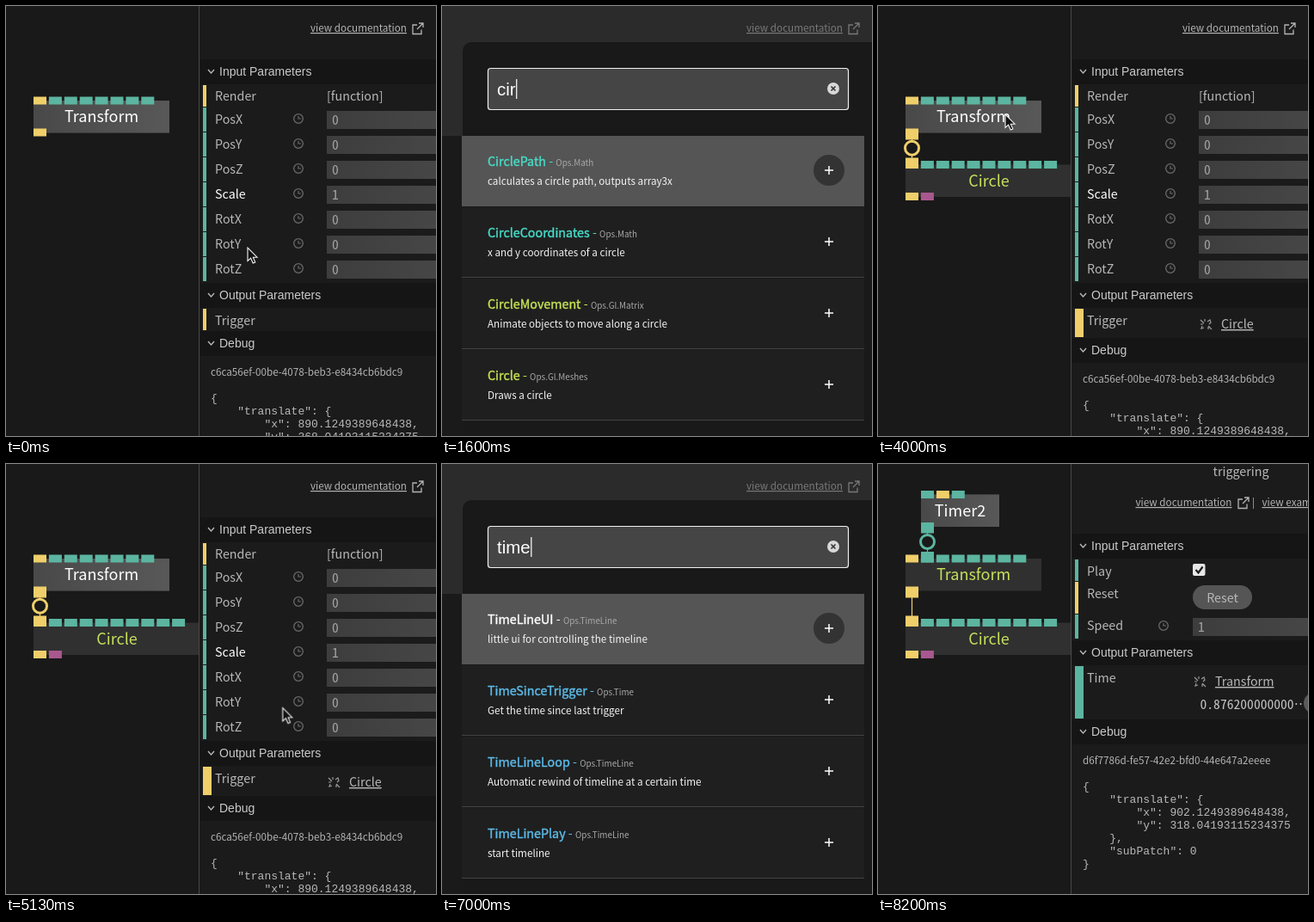
Recreate the animation shown at these times as an HTML page. Size 500 by 500 pixels, loop 8.27 s.

```html
<!DOCTYPE html>
<html lang="en">
<head>
<meta charset="utf-8">
<title>Node editor</title>
<style>
html, body { margin: 0; width: 100%; height: 100%; overflow: hidden; background: #191919; }
svg { display: block; width: 100vw; height: 100vh; }
text { font-family: "Noto Sans CJK SC", "Noto Sans CJK JP", "Source Sans Pro", "Open Sans", sans-serif; white-space: pre; }
.label { font-size: 14.3px; fill: #b8b8b8; }
.hot { fill: #fff; }
.small { font-size: 11.7px; fill: #b4b4b4; }
.white { font-size: 11.7px; fill: #f4f4f4; }
.op { font-size: 18px; fill: #c6e25c; text-anchor: middle; }
.op.on { fill: #fff; }
.mid { text-anchor: middle; }
.under { text-decoration: underline; }
.head { font: 14px "Liberation Sans", Arial, sans-serif; fill: #cacaca; }
.value { font: 15.6px "Noto Sans Mono CJK SC", "Noto Sans Mono CJK JP", "Noto Sans Mono", monospace; fill: #a4a4a4; }
.json { font: 13px "Liberation Mono", monospace; fill: #b8b8b8; }
.query { font: 20.5px "Liberation Sans", Arial, sans-serif; fill: #fff; }
.title { font-size: 14.3px; }
.name { stroke-width: .4px; }
.ns { font-size: 9.9px; fill: #a8a8a8; }
</style>
</head>
<body>
<svg id="stage" viewBox="0 0 500 500"></svg>
<script>
const LOOP = 8270;
const COLOR = { y: '#f0cf6a', t: '#5cb5a0', p: '#a9588f' };
const stage = document.getElementById('stage');
const tracks = [];

// Timing helpers: every animated group registers its opacity steps.
const track = (steps, content, easing = 'linear') =>
  `<g id="track${tracks.push({ steps, easing }) - 1}">${content}</g>`;
const during = (windows, content) => {
  const steps = windows.flatMap(([from, to]) => [[from, 1], [to, 0]]);
  if (steps[0][0] > 0) steps.unshift([0, 0]);
  if (steps.at(-1)[0] < LOOP) steps.push([LOOP, 0]);
  return track(steps, content, 'steps(1, end)');
};
const play = (el, prop, steps, easing) => el.animate(
  steps.map(([time, value]) => ({ offset: time / LOOP, [prop]: value, easing })),
  { duration: LOOP, iterations: Infinity });

// Drawing helpers
const rect = (x, y, w, h, fill, more = '') =>
  `<rect x="${x}" y="${y}" width="${w}" height="${h}" fill="${fill}" ${more}/>`;
const circle = (x, y, r, fill, more = '') => `<circle cx="${x}" cy="${y}" r="${r}" fill="${fill}" ${more}/>`;
const stroke = (d, color, width = 1) => `<path d="${d}" fill="none" stroke="${color}" stroke-width="${width}"/>`;
const text = (x, y, s, cls, more = '') => `<text x="${x}" y="${y}" class="${cls}" ${more}>${s}</text>`;

// Node graph
const ports = (kinds, x, y, h) =>
  [...kinds].map((k, i) => rect(x + i * 17.9, y, 15, h, COLOR[k])).join('');

const node = ({ x, y, w, name, ins, outs, selected, flash }) => {
  const body = (fill, cls) => rect(x, y, w, 37.5, fill) + text(x + w / 2, y + 25, name, 'op ' + cls);
  const glow = flash === undefined ? '' : track(
    [[0, 0], [flash, 0], [flash, 1], [flash + 400, 1], [flash + 830, 0], [LOOP, 0]],
    rect(x, y, w, 37.5, '#21895b', 'stroke="#22ee8a" stroke-width="3.5"') +
    text(x + w / 2, y + 25, name, 'op on'));
  return body('#303030', '') + during(selected, body('url(#bright)', 'on')) + glow +
    ports(ins, x, y - 4.5, 9) + ports(outs, x, y + 32.5, 9);
};

const cable = (x, top, bottom, color, ring) =>
  stroke(`M${x} ${top}V${bottom}`, color, 1.2) +
  rect(x - 7.5, top, 15, 12.5, color) + rect(x - 7.5, bottom - 12.5, 15, 12.5, color) +
  (ring ? circle(x, (top + bottom) / 2 - .8, 8, '#191919', `stroke="${color}" stroke-width="3"`) : '');

// Parameter panel
const heading = (y, s) => rect(226, y - 14, 274, 29, '#151515') +
  stroke(`M235 ${y - 2}l3.5 4 3.5-4`, '#bbb', 1.3) + text(248, y + 5, s, 'head');
const bar = (y, h, kind, linked) => rect(229, y, linked ? 10 : 4, h, COLOR[kind]);
const label = (y, s, cls = '') => text(243, y + 5, s, 'label ' + cls);
const clock = (x, y) => circle(x, y, 5.3, 'none', 'stroke="#6a6a6a" stroke-width="1.3"') +
  stroke(`M${x} ${y - 3}V${y}H${x + 3}`, '#6a6a6a', 1.2);
const field = (x, y, s, fill = 'url(#field)') => rect(x, y - 10, 500 - x, 21, fill) + text(x + 6, y + 5.5, s, 'value');
const numberRow = (x, y, name, value, cls, fill) => bar(y - 14, 28, 't') + label(y, name, cls) +
  clock(x - (x === 401 ? 28 : 33), y - 1) + field(x, y, value, fill);
const checkbox = (x, y, on) => on
  ? rect(x, y, 14.5, 14, '#e6e6e6', 'rx="2"') + stroke(`M${x + 3.5} ${y + 7}l3 3.5 5-7`, '#1c1c1c', 2.2)
  : rect(x, y, 14.5, 14, '#555', 'rx="2"');
const link = (x, y, s) => stroke(
  `M${x - 7} ${y - 5}l4 4M${x - 2} ${y - 6}v3M${x - 7} ${y}h3M${x - 3} ${y + 4}l-3 1 1-3` +
  `M${x + 1} ${y - 3}l3-2 1 3-2 2M${x + 2} ${y + 2}l4 4M${x + 2} ${y + 3}v3`, '#999', 1.2) +
  text(x + 17, y + 5, s, 'label under');
const openIcon = x => stroke(`M${x + 5} 22h-5v10.5h10v-5M${x + 7} 20h5v5M${x + 12} 20l-7 7`, '#b4b4b4', 1.3);
const docs = both => both
  ? text(299.5, 30, 'view documentation', 'small under') + openIcon(419) +
    text(435, 30, '|', 'small') + text(446.5, 30, 'view example', 'small under')
  : text(354, 30, 'view documentation', 'small under') + openIcon(473);
const debug = (y, id, px, py) => heading(y, 'Debug') + text(238, y + 38, id, 'small') +
  ['{', '    "translate": {', `        "x": ${px},`, `        "y": ${py}`, '    },', '    "subPatch": 0', '}']
    .map((line, i) => text(238, y + 68 + i * 15, line, 'json')).join('');

const transformPanel = linked => docs() + heading(76, 'Input Parameters') +
  bar(92, 25, 'y') + label(105, 'Render') + text(373, 110, '[function]', 'label') +
  ['PosX', 'PosY', 'PosZ', 'Scale', 'RotX', 'RotY', 'RotZ'].map((name, i) =>
    numberRow(373, 132 + i * 29, name, name === 'Scale' ? 1 : 0, name === 'Scale' ? 'hot' : '')).join('') +
  heading(336, 'Output Parameters') + bar(352, linked ? 33 : 25, 'y', linked) + label(366, 'Trigger') +
  (linked ? link(382, 370, 'Circle') : '') +
  debug(linked ? 400 : 392, 'c6ca56ef-00be-4078-beb3-e8434cb6bdc9', '890.1249389648438', '368.04193115234375');

const circlePanel = docs(true) + heading(76, 'Input Parameters') +
  bar(92, 25, 'y', true) + label(105, 'Render') + link(409, 105, 'Transform') +
  [['Segments', 40], ['Radius', 0.5], ['InnerRadius', 0], ['Percent', 1], ['Steps', 0]].map(([name, value], i) =>
    numberRow(401, 132 + i * 29, name, value, '', name === 'Percent' ? '#555' : undefined)).join('') +
  [[263, 27], [291, 25], [317, 27], [345, 25]].map(([y, h]) => bar(y, h, 't')).join('') +
  label(277, 'InvertSteps') + checkbox(401, 268) + label(302, 'Draw') + checkbox(401, 294, true) +
  label(329, 'Mapping') + rect(401, 319, 58, 22, '#484848', 'rx="3"') + text(412, 334, 'flat', 'value', 'style="font-size:13.8px"') +
  '<path d="M447 328l3-4 3 4zM447 332l3 4 3-4z" fill="#bbb"/>' +
  label(359, 'Spline', 'under') + checkbox(401, 350) +
  heading(386, 'Output Parameters') + bar(403, 25, 'y') + label(415, 'Trigger') +
  bar(428, 33, 'p') + label(442, 'Geometry') + circle(413, 444, 12, '#5a5a5a') +
  circle(412, 443, 4.2, 'none', 'stroke="#eee" stroke-width="2"') + stroke('M415 446l4 4', '#eee', 2.4) +
  heading(476, 'Debug');

const timerPanel = text(422, 14, 'triggering', 'label mid') +
  `<g transform="translate(0 19)">${docs(true)}</g>` + heading(95, 'Input Parameters') +
  bar(111, 25, 't') + label(125, 'Play') + checkbox(366, 116, true) +
  bar(137, 37, 'y') + label(151, 'Reset') + rect(366, 141, 69, 28, '#555', 'rx="14"') + text(400.5, 160.5, 'Reset', 'label mid') +
  bar(175, 28, 't') + label(188, 'Speed') + clock(332, 188) + field(366, 189, 1) +
  heading(219, 'Output Parameters') + bar(235, 61, 't', true) + label(249, 'Time') + link(375, 253, 'Transform') +
  '<text id="counter" x="374.5" y="285" class="value" style="fill:#c4c4c4"></text>' + circle(507, 278, 12, '#5a5a5a') +
  debug(311, 'd6f7786d-fe57-42e2-bfd0-44e647a2eeee', '902.1249389648438', '318.04193115234375');

// Search dialog
const TEAL = '#48dcc8', LIME = '#c6e254', BLUE = '#5cbcea', WHITE = '#fff';
const OPS = {
  path: ['CirclePath', 'Ops.Math', 'calculates a circle path, outputs array3x', TEAL],
  coords: ['CircleCoordinates', 'Ops.Math', 'x and y coordinates of a circle', TEAL],
  move: ['CircleMovement', 'Ops.Gl.Matrix', 'Animate objects to move along a circle', LIME],
  circle: ['Circle', 'Ops.Gl.Meshes', 'Draws a circle', LIME],
  texture: ['Circle', 'Ops.Gl.TextureEffects', 'draw 2d circle into texture', LIME],
  transform: ['Transform', 'Ops.Gl.Matrix', 'translate, scale and rotate', LIME],
  view: ['TransformView', 'Ops.Gl.Matrix', 'transform the view matrix', LIME],
  lineUi: ['TimeLineUI', 'Ops.TimeLine', 'little ui for controlling the timeline', WHITE],
  since: ['TimeSinceTrigger', 'Ops.Time', 'Get the time since last trigger', BLUE],
  loop: ['TimeLineLoop', 'Ops.TimeLine', 'Automatic rewind of timeline at a certain time', BLUE],
  start: ['TimeLinePlay', 'Ops.TimeLine', 'start timeline', BLUE],
  timer: ['Timer2', 'Ops.Anim', 'timer with play, reset and triggering', BLUE]
};
const CIR = ['path', 'coords', 'move', 'circle'];
const CIRCLE = ['circle', 'texture', 'path', 'coords'];
const TIME = ['lineUi', 'since', 'loop', 'start'];
const SEARCHES = [
  [500, 1270, 'transform', ['transform', 'view'], true],
  [1270, 1600, 'c', []],
  [1600, 1670, 'cir', CIR],
  [1670, 1730, 'circ', CIR],
  [1730, 2100, 'circle', CIRCLE],
  [5600, 6270, 'circle', CIRCLE, true],
  [6270, 6470, 't', []],
  [6470, 6670, 'ti', []],
  [6670, 6870, 'ti', TIME],
  [6870, 6930, 'tim', TIME],
  [6930, 7070, 'time', TIME],
  [7070, 7400, 'timer', ['timer', 'since', 'lineUi', 'loop']]
];

const result = (key, i) => {
  const [name, space, about, color] = OPS[key];
  const y = 151 + i * 83;
  return (i ? rect(23, y, 468, 82, '#1f1f1f') + stroke(`M23 ${y + 81.5}H491`, '#444')
            : rect(23, y, 468, 82, '#555') + circle(450, 191, 18, '#333')) +
    text(53, y + 35, `<tspan class="name" stroke="${color}">${name}</tspan> - <tspan class="ns">${space}</tspan>`,
      'title', `fill="${color}"`) +
    text(53, y + 56.5, about, 'white') + stroke(`M445 ${y + 40}h10M450 ${y + 35}v10`, '#fff', 1.5);
};
const search = ([from, to, query, list, marked]) => during([[from, to]],
  `<rect class="mark" x="64" y="85" height="23" fill="${marked ? '#0c0c0c' : '#fff'}" data-marked="${marked ? 1 : ''}"/>` +
  text(64, 104, query, 'query') + list.map(result).join(''));

const dialog = track(
  [[0, 0], [500, 0], [700, 1], [1985, 1], [2060, 0], [5640, 0], [5840, 1], [7255, 1], [7330, 0], [LOOP, 0]],
  rect(0, 0, 500, 500, '#3c3c3c', 'opacity=".5"') + rect(0, 0, 290, 151, '#2b2b2b') + rect(0, 151, 500, 349, '#1a1a1a') +
  rect(24, 42, 490, 470, '#191919', 'rx="10"') +
  rect(53.5, 72.5, 419, 48, '#454545', 'rx="3" stroke="#f0f0f0" stroke-width="1.2"') +
  circle(455, 96, 7, '#d8d8d8') + stroke('M452.5 93.5l5 5M457.5 93.5l-5 5', '#333', 1.6) +
  SEARCHES.map(search).join(''));

const gradient = (id, from, to) => `<linearGradient id="${id}"><stop stop-color="${from}"/>` +
  `<stop offset="1" stop-color="${to}"/></linearGradient>`;

stage.innerHTML = `<defs>${gradient('bright', '#494949', '#585858')}${gradient('field', '#3d3d3d', '#464646')}</defs>` +
  rect(0, 0, 500, 500, '#191919') +
  node({ x: 32, y: 110, w: 158, name: 'Transform', ins: 'yttttttt', outs: 'y', selected: [[0, 2000], [3730, 7270]] }) +
  during([[2000, LOOP]],
    node({ x: 32, y: 184.5, w: 194, name: 'Circle', ins: 'yttttttttt', outs: 'yp', selected: [[2000, 3730]], flash: 2000 })) +
  during([[2000, 7270]], cable(39.5, 143, 189, COLOR.y, true)) +
  during([[7270, LOOP]],
    node({ x: 50, y: 35.5, w: 91, name: 'Timer2', ins: 'tyt', outs: 't', selected: [[7270, LOOP]], flash: 7270 }) +
    cable(39.5, 143, 189, COLOR.y) + cable(57.5, 68, 114.5, COLOR.t, true)) +
  rect(225, 0, 275, 500, '#1b1b1b') + stroke('M224.5 0V500', '#484848') +
  during([[0, 2000]], transformPanel(false)) +
  during([[2000, 3730]], circlePanel) +
  during([[3730, 7270]], transformPanel(true)) +
  during([[7270, LOOP]], timerPanel) +
  dialog +
  during([[0, 1130], [2870, 6270]],
    '<path id="cursor" d="M0 0V15.5L3.6 12.2 6.2 18 8.8 16.9 6.3 11.2H11Z" fill="#111" stroke="#f4f4f4" stroke-width="1.1"/>');

// Caret or selection sized to the typed query
for (const mark of document.querySelectorAll('.mark')) {
  const width = mark.nextElementSibling.getComputedTextLength();
  mark.setAttribute('x', mark.dataset.marked ? 64 : 64.5 + width);
  mark.setAttribute('width', mark.dataset.marked ? width : 1.2);
}

tracks.forEach(({ steps, easing }, i) => play(document.getElementById('track' + i), 'opacity', steps, easing));
const clockwork = play(document.getElementById('cursor'), 'transform', [
  [0, 281, 281], [60, 281, 281], [250, 272, 325], [450, 257, 363], [2860, 257, 363], [2860, 440, 219],
  [3250, 300, 175], [3650, 160, 121], [4000, 148, 126], [4530, 142, 122], [4600, 140, 118], [4800, 98, 150],
  [5130, 322, 284], [5400, 243, 142], [5530, 260, 137], [LOOP, 260, 137]
].map(([time, x, y]) => [time, `translate(${x}px, ${y}px)`]), 'linear');

const counter = document.getElementById('counter');
function tick() {
  const seconds = Math.max(0, ((clockwork.currentTime || 0) % LOOP - 7307.1) / 1000);
  counter.textContent = seconds.toFixed(4) + '00000000…';
  requestAnimationFrame(tick);
}
tick();
</script>
</body>
</html>
```
